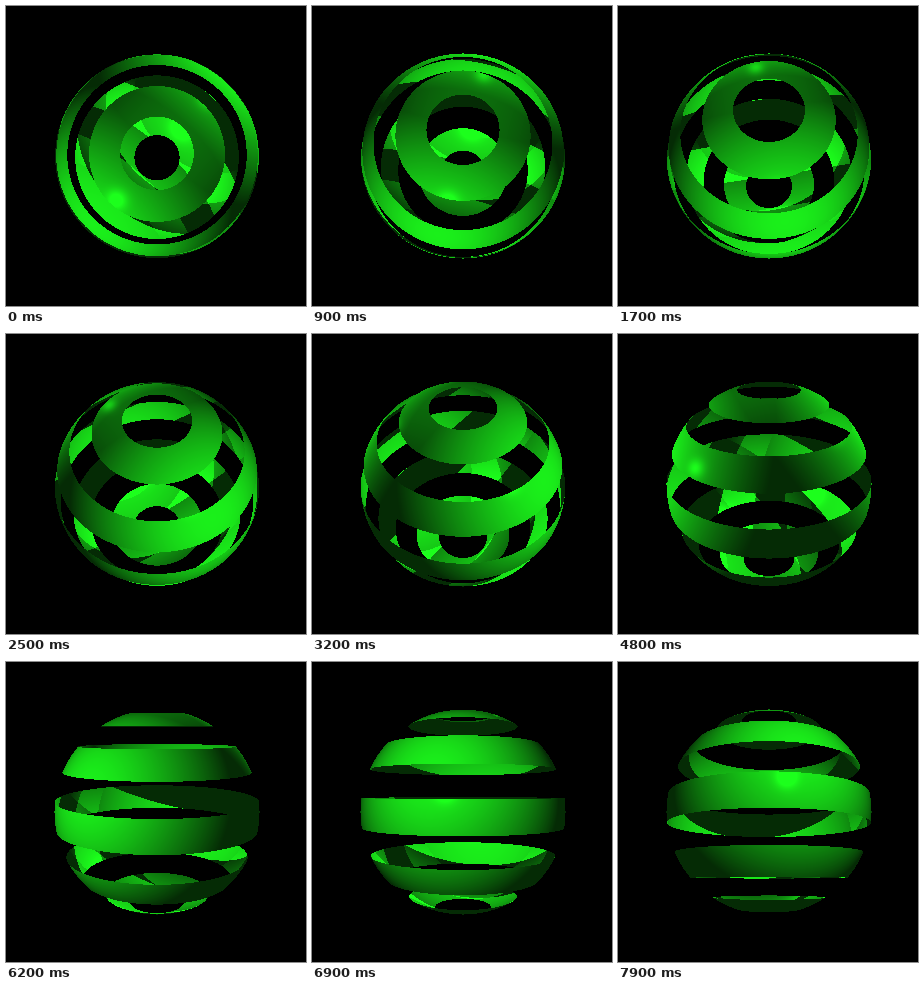
Recreate the animation shown at these times as an HTML page with a canvas. Size 300x300 px, loop 8000 ms.

```html
<!DOCTYPE html>
<html>
<head>
<meta charset="utf-8">
<style>
html, body { margin: 0; width: 100%; height: 100%; overflow: hidden; background: #000; }
canvas { display: block; width: 300px; height: 300px; }
</style>
</head>
<body>
<canvas id="stage" width="300" height="300"></canvas>
<script>
const SIZE = 300, CX = 151, CY = 150;
const DIST = 4, FOCAL = 397;          // camera distance in sphere radii, focal length in pixels
const FRAME = 100, FRAMES = 80;
const AMBIENT = 0.17, DIFFUSE = 0.77, SPECULAR = 0.3, SHINE = 150;
const RAD = Math.PI / 180;

const ctx = document.getElementById('stage').getContext('2d');
const image = ctx.createImageData(SIZE, SIZE);
const data = image.data;

// Eleven equal slices of latitude; every second one is solid, the poles are open.
const edges = [1, 3, 5, 7, 9].map(k => Math.sin(k * 90 / 11 * RAD));
function solid(z) {
  const h = Math.abs(z);
  return h < edges[0] || (h > edges[1] && h < edges[2]) || (h > edges[3] && h < edges[4]);
}

function orbit(angle, radius, height) {
  return [radius * Math.cos(angle * RAD), radius * Math.sin(angle * RAD), height];
}

// Brightness of the sphere point p seen along the unit ray d; side is 1 outside, -1 inside.
function shade(px, py, pz, dx, dy, dz, side, lights) {
  let sum = AMBIENT;
  for (const [ax, ay, az] of lights) {
    let lx = ax - px, ly = ay - py, lz = az - pz;
    const len = Math.hypot(lx, ly, lz);
    lx /= len; ly /= len; lz /= len;
    const facing = px * lx + py * ly + pz * lz;
    if (facing * side <= 0) continue;
    // Light reaching the inside has to enter through a gap.
    if (side < 0 && solid(pz - 2 * facing * lz)) continue;
    const hx = lx - dx, hy = ly - dy, hz = lz - dz;
    const half = side * (px * hx + py * hy + pz * hz) / Math.hypot(hx, hy, hz);
    sum += DIFFUSE * facing * side + SPECULAR * Math.pow(Math.max(half, 0), SHINE);
  }
  return Math.min(sum, 1);
}

function draw(n) {
  const el = (90 - 1.25 * (n + 1)) * RAD;
  const s = Math.sin(el), c = Math.cos(el);
  const turn = -3 * (n + 1);
  const lights = [orbit(135 + turn, 2.83, 2), orbit(-45 + turn, 2.83, 1)];
  const camY = DIST * c, camZ = DIST * s;

  for (let y = 0, i = 0; y < SIZE; y++) {
    for (let x = 0; x < SIZE; x++, i += 4) {
      const u = (x + 0.5 - CX) / FOCAL, v = (CY - y - 0.5) / FOCAL;
      const len = Math.hypot(u, v, 1);
      const dx = u / len, dy = (-v * s - c) / len, dz = (v * c - s) / len;
      const mid = DIST / len;
      const disc = mid * mid - DIST * DIST + 1;
      let light = 0;
      if (disc > 0) {
        const root = Math.sqrt(disc);
        for (const side of [1, -1]) {
          const t = mid - side * root;
          const pz = camZ + t * dz;
          if (solid(pz)) {
            light = shade(t * dx, camY + t * dy, pz, dx, dy, dz, side, lights);
            break;
          }
        }
      }
      data[i] = data[i + 2] = 28 * light;
      data[i + 1] = 255 * light;
      data[i + 3] = 255;
    }
  }
  ctx.putImageData(image, 0, 0);
}

const start = performance.now();
let shown = -1;
function tick() {
  const n = Math.floor((performance.now() - start) / FRAME) % FRAMES;
  if (n !== shown) draw(shown = n);
  requestAnimationFrame(tick);
}
tick();
</script>
</body>
</html>
```
